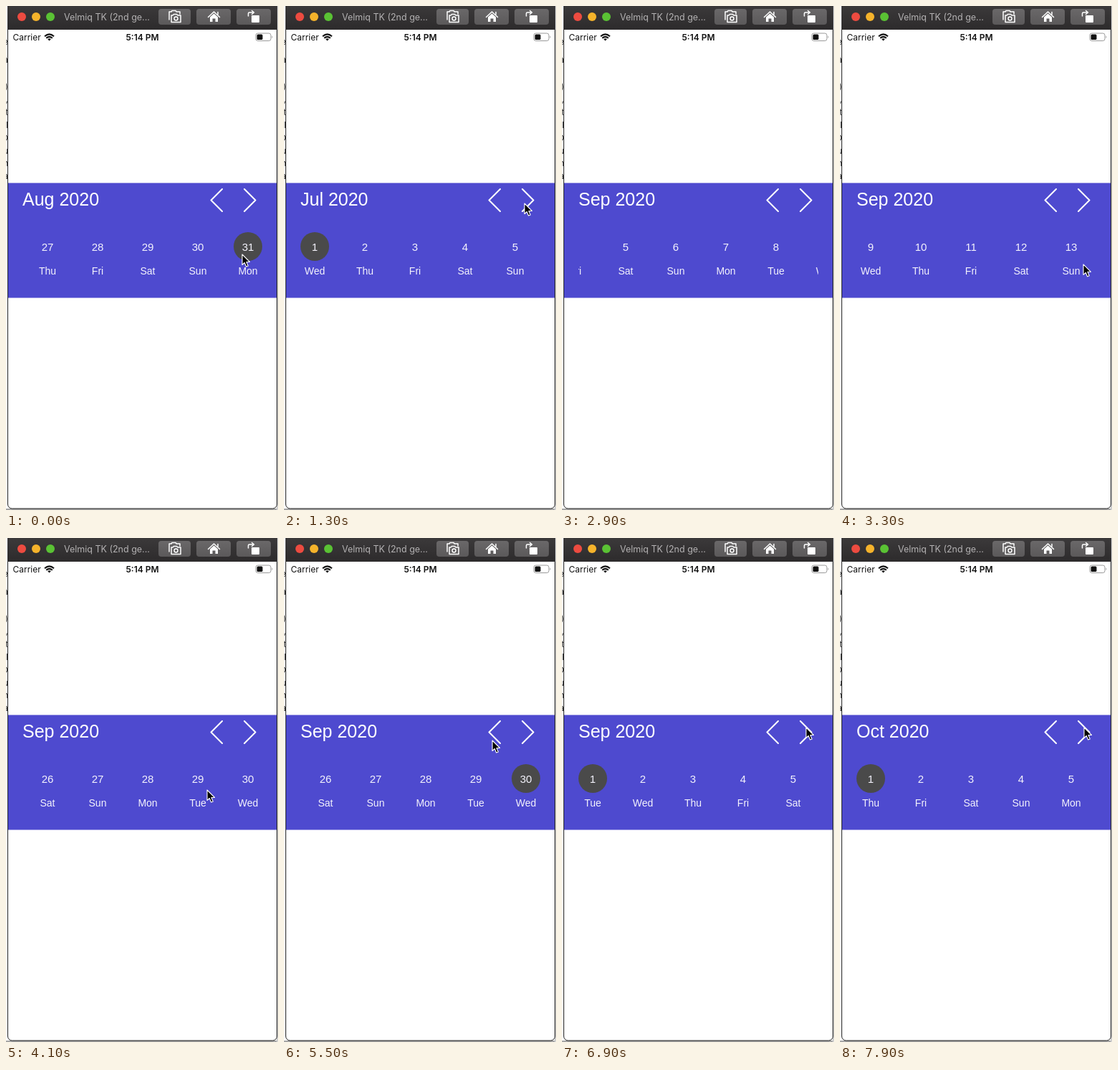
These frames come from a looping animation (380x702 px, 8 s). An HTML page:

```html
<!DOCTYPE html>
<html lang="en">
<head>
<meta charset="utf-8">
<title>Calendar strip</title>
<style>
  html, body { margin: 0; width: 100%; height: 100%; overflow: hidden; background: #fff; }
  svg { display: block; width: 100%; height: 100%; }
  .ui { font-family: Inter, Roboto, sans-serif; font-size: 12px; }
  .strip { font-family: "Liberation Sans", Arial, sans-serif; fill: #fff; }
  .days { text-anchor: middle; fill: #f4f3fc; }
  .line { fill: none; stroke: #fff; stroke-width: 2; stroke-linecap: round; stroke-linejoin: round; }
</style>
</head>
<body>
<svg viewBox="0 0 380 702">
  <defs>
    <linearGradient id="bar" x2="0" y2="1">
      <stop stop-color="#3b393a"/><stop offset="1" stop-color="#2d2b2c"/>
    </linearGradient>
    <linearGradient id="button" x2="0" y2="1">
      <stop stop-color="#6a6869"/><stop offset="1" stop-color="#5b595a"/>
    </linearGradient>
    <clipPath id="viewport"><rect x="23" y="305" width="335" height="90"/></clipPath>
  </defs>

  <rect width="380" height="702" fill="#fff"/>
  <g id="behind" class="ui" text-anchor="end" fill="#333"></g>
  <rect y="700" width="380" height="2" fill="#a5a5a5"/>
  <rect x="378" width="2" height="702" fill="#cfcfcf"/>

  <!-- Window -->
  <path d="M2.5 0V694a6 6 0 0 0 6 6H372.500a6 6 0 0 0 6-6V0" fill="#fff" stroke="#222"/>
  <rect x="2" width="377" height="33" fill="url(#bar)"/>
  <circle cx="22" cy="15" r="6" fill="#ed4b40"/>
  <circle cx="42" cy="15" r="6" fill="#f5b32b"/>
  <circle cx="62" cy="15" r="6" fill="#5ac234"/>
  <text class="ui" x="81" y="20" style="font-size:12.5px" fill="#b3b1b2">Velmiq TK (2nd ge...</text>
  <g fill="url(#button)">
    <rect x="213" y="4" width="45" height="22" rx="4"/>
    <rect x="266" y="4" width="48" height="22" rx="4"/>
    <rect x="322" y="4" width="48" height="22" rx="4"/>
  </g>
  <g class="line" style="stroke-width:1.5">
    <path d="M228 19V8H231L232 6.500H237L238 8H243V11"/>
    <path d="M231 13H233L234.500 11.500H238.500L240 13H244V22.500H231Z"/>
    <circle cx="237.500" cy="17.500" r="2.500"/>
    <path d="M282.500 15.500L290.500 8L298.500 15.500M296 8.500V12"/>
    <path d="M285 15.500L290.500 10.500L296 15.500V22H292.500V17.500H288.500V22H285Z" fill="#fff" stroke="none"/>
    <path d="M338.500 14V10.500Q338.500 9 340 9H346M343.500 6.500L346.500 9L343.500 11.500"/>
    <rect x="343" y="13" width="11" height="10" rx="1" fill="#fff" stroke="none"/>
  </g>

  <!-- Status bar -->
  <g class="ui" fill="#111">
    <text x="9.500" y="48">Carrier</text>
    <text x="190.500" y="47.500" text-anchor="middle" font-weight="600">5:14 PM</text>
    <g fill="none" stroke="#111" stroke-width="2">
      <path d="M54 42.300Q60.500 36.500 67 42.300M56.200 44.800Q60.500 41 64.800 44.800"/>
      <path d="M58.200 46.200Q60.500 44.400 62.800 46.200L60.500 48.600Z" fill="#111" stroke="none"/>
    </g>
    <rect x="349" y="38" width="21" height="10.500" rx="2.800" fill="none" stroke="#999"/>
    <rect x="350.500" y="39.500" width="8" height="7.500" rx="1.500"/>
    <path d="M371.500 41.500Q373.500 43.200 371.500 45Z" fill="#999"/>
  </g>

  <!-- Calendar -->
  <rect x="3" y="246.500" width="375" height="160" fill="#4e4acf"/>
  <g class="strip">
    <text id="title" x="23" y="278" font-size="25"></text>
    <path class="line" d="M302 255L286.500 270.500L302 286M333 255L348.500 270.500L333 286"/>
    <g clip-path="url(#viewport)">
      <g id="days" class="days">
        <circle id="mark" cy="335" r="20" fill="#4a4a4a"/>
      </g>
    </g>
  </g>
  <path id="cursor" d="M0 0V14.500L3.300 11.500L5.600 17L8.200 15.900L5.900 10.500H10.500Z"
        fill="#000" stroke="#fff" stroke-width="1.100" stroke-linejoin="round"/>
</svg>

<script>
const LOOP = 8000, STEP = 100, YEAR = 2020, PITCH = 70;
const MONTHS = ["Jan", "Feb", "Mar", "Apr", "May", "Jun", "Jul", "Aug", "Sep", "Oct", "Nov", "Dec"];
const WEEKDAYS = ["Sun", "Mon", "Tue", "Wed", "Thu", "Fri", "Sat"];
const JUL = 6, AUG = 7, SEP = 8, OCT = 9;

// [time, month, selected day]
const selections = [
  [0, AUG, 31], [500, JUL, 1], [1500, AUG, 1], [2100, SEP, 1],
  [4700, SEP, 30], [5700, AUG, 1], [6900, SEP, 1], [7500, OCT, 1]
];

const linear = p => p;
const inOut = p => p < .5 ? 2 * p * p : 1 - 2 * (1 - p) ** 2;
const out = p => 1 - (1 - p) ** 2;

// [time, offset, easing towards the next key]
const scrollKeys = [
  [0, 1805, linear], [500, 1805, inOut], [895.7, 0, linear],
  [2700, 0, linear], [2900, 234, out], [3300, 560, linear],
  [3400, 600, linear], [3600, 1060, out], [4000, 1735, linear],
  [5700, 1735, inOut], [6095.7, 0, linear], [LOOP, 0, linear]
];
const cursorX = [
  [0, 330], [100, 330], [450, 292], [900, 292], [1300, 336], [2200, 336], [2600, 352],
  [2900, 130], [3300, 340], [3600, 150], [4100, 281], [4500, 331], [4800, 331],
  [5400, 291], [6000, 292], [6100, 292], [6600, 341], [LOOP, 341]
];
const cursorY = [
  [0, 346], [100, 346], [450, 280], [900, 280], [1300, 275], [2200, 275], [2600, 359],
  [3600, 360], [4100, 351], [4500, 347], [4800, 347],
  [5400, 282], [5500, 282], [6000, 278], [6100, 278], [6600, 264], [LOOP, 264]
];

function track(keys, t) {
  const i = keys.findIndex(key => key[0] > t);
  const [t0, v0, ease = inOut] = keys[i - 1], [t1, v1] = keys[i];
  return v0 + (v1 - v0) * ease((t - t0) / (t1 - t0));
}

const $ = id => document.getElementById(id);
function addText(parent, x, y, size, content = "") {
  const node = document.createElementNS("http://www.w3.org/2000/svg", "text");
  Object.entries({ x, y, "font-size": size }).forEach(([k, v]) => node.setAttribute(k, v));
  node.textContent = content;
  return parent.appendChild(node);
}

[..."ea),tlOuna"].forEach((letter, i) =>
  addText($("behind"), 3, i < 2 ? 54 + i * 25 : 116 + (i - 2) * 17.9, 12, letter));

const dayX = day => 43 + (day - 1) * PITCH;
const cells = Array.from({ length: 31 }, (_, i) => ({
  number: addText($("days"), dayX(i + 1), 341, 15),
  weekday: addText($("days"), dayX(i + 1), 374, 14)
}));

let shownMonth;
function showMonth(month) {
  if (month === shownMonth) return;
  shownMonth = month;
  $("title").textContent = `${MONTHS[month]} ${YEAR}`;
  const count = new Date(YEAR, month + 1, 0).getDate();
  cells.forEach(({ number, weekday }, i) => {
    const visible = i < count;
    number.textContent = visible ? i + 1 : "";
    weekday.textContent = visible ? WEEKDAYS[new Date(YEAR, month, i + 1).getDay()] : "";
  });
}

function draw(now) {
  const t = Math.floor(now % LOOP / STEP) * STEP;
  const [, month, selected] = selections.filter(s => s[0] <= t).pop();
  showMonth(month);
  $("mark").setAttribute("cx", dayX(selected));
  $("days").setAttribute("transform", `translate(${-track(scrollKeys, t)} 0)`);
  $("cursor").setAttribute("transform", `translate(${track(cursorX, t)} ${track(cursorY, t)})`);
  $("cursor").setAttribute("visibility", t >= 2800 && t < 3000 ? "hidden" : "visible");
  requestAnimationFrame(draw);
}
draw(0);
</script>
</body>
</html>
```
